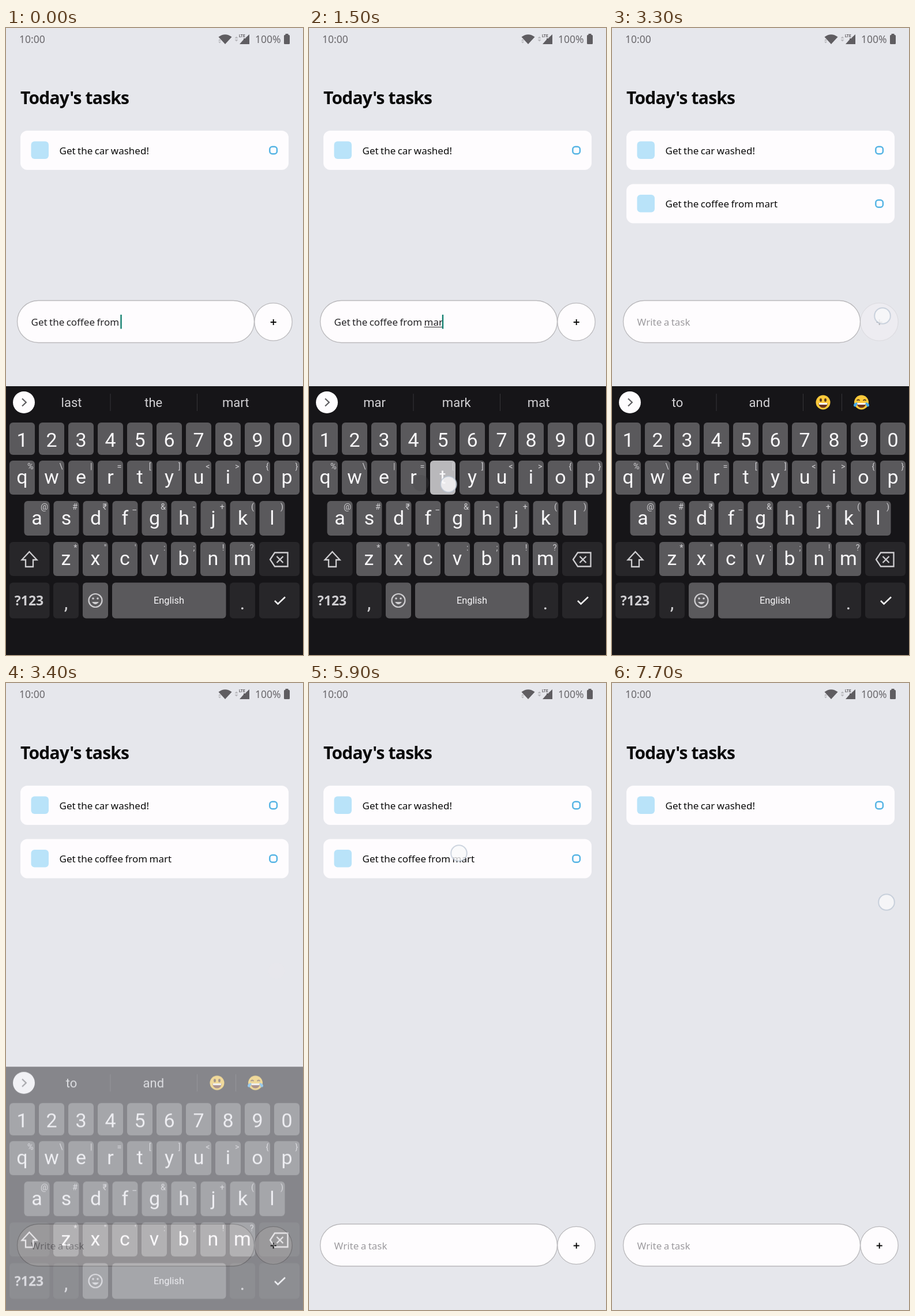
These frames come from a looping animation (515 px wide and 1087 px high, 7800 ms). An HTML page with a canvas:

```html
<!DOCTYPE html>
<html lang="en">
<head>
<meta charset="utf-8">
<title>Today's tasks</title>
<style>
html, body { margin: 0; width: 100%; height: 100%; overflow: hidden; background: #e6e7ec; }
canvas { display: block; }
</style>
</head>
<body>
<canvas id="stage" width="515" height="1087"></canvas>
<script>
const LOOP = 7800, STEP = 100, TAU = Math.PI * 2;
const c = document.getElementById('stage').getContext('2d');
const UI = '"Noto Sans", sans-serif', KEYS = 'Roboto, sans-serif';
const WHITE = '#fefcfe', KEY = '#5a595c', DARK_KEY = '#272629', KEYBOARD = '#161518';

// Touches: x, y, start, end of hold, key lit while held
const touches = [
  [418, 925, 1000, 1100, 'm'], [42, 855, 1200, 1250, 'a'],
  [194, 789, 1300, 1400, 'r'], [242, 791, 1500, 1600, 't'],
  [290, 995, 1700, 1950], [469, 499, 3100, 3300],
  [260, 295, 5900, 6050], [460, 389, 7100, 7250], [476, 380, 7700, 7800]
];
const typedAt = [1100, 1300, 1400, 1600];
const hints = [
  ['last', 'the', 'mart'], ['m', 'my', 'me'], ['ma', 'man', 'make'],
  ['mar', 'mark', 'mat'], ['mart', 'marts', 'market']
];
// Rows: letters, corner symbols, left, top, height, baseline
const rows = [
  ['1234567890', '', 6, 684, 56, 726],
  ['qwertyuiop', '%\\|=[]<>{}', 6, 750, 59, 790],
  ['asdfghjkl', '@#₹_&-+()', 31.5, 820, 60, 861],
  ['zxcvbnm', '*"\':;!?', 82, 891, 59, 931]
];

const during = (t, a, b) => t >= a && t < b;

function box(x, y, w, h, r, fill, stroke, width = 1) {
  c.beginPath();
  c.roundRect(x, y, w, h, r);
  paint(fill, stroke, width);
}

function disc(x, y, r, fill, stroke, width = 1) {
  c.beginPath();
  c.arc(x, y, r, 0, TAU);
  paint(fill, stroke, width);
}

function paint(fill, stroke, width) {
  if (fill) { c.fillStyle = fill; c.fill(); }
  if (stroke) { c.strokeStyle = stroke; c.lineWidth = width; c.stroke(); }
}

function shape(d, fill, stroke, width) {
  const path = new Path2D(d);
  if (fill) { c.fillStyle = fill; c.fill(path); }
  if (stroke) { c.strokeStyle = stroke; c.lineWidth = width; c.stroke(path); }
}

function text(s, x, y, font, fill, align = 'left') {
  c.font = font;
  c.fillStyle = fill;
  c.textAlign = align;
  c.fillText(s, x, y);
}

function withAlpha(a, draw) {
  c.save();
  c.globalAlpha *= a;
  draw();
  c.restore();
}

function statusBar() {
  const ink = '#5f5d61', pale = '#b9b9bd';
  text('10:00', 23, 26, '17.5px ' + UI, '#69676b');
  text('100%', 432, 26, '17.5px ' + UI, '#69676b');
  shape('M368.5 15.5Q380 7 391.5 15.5L380 28Z', ink);
  shape('M368 22l2.5-3 2.5 3zM368 23.5l2.5 3 2.5-3z', pale);
  shape('M396.5 18l3-3.5 3 3.5zM396.5 20l3 3.5 3-3.5z', pale);
  shape('M422 11V28H405L412 20V18H415.5V17Z', ink);
  text('LTE', 404, 16, 'bold 6.5px ' + KEYS, ink);
  box(482, 12, 10, 16, 1.5, ink);
  box(484.5, 10, 5, 3, 0.5, ink);
}

function label(s, x, y, fill) {
  c.wordSpacing = '-1px';
  text(s, x, y, '17px ' + UI, fill);
  const width = c.measureText(s).width;
  c.wordSpacing = '0px';
  return width;
}

function card(y, task) {
  box(25, y, 465, 68, 12, WHITE);
  box(43.5, y + 18.5, 30.5, 30.5, 6, '#b9e3f9');
  label(task, 92.5, y + 40.5, '#0b0b0b');
  box(457.3, y + 27.7, 12.6, 12.6, 4.5, null, '#55b4e4', 2.5);
}

function composer(t, typed) {
  const dy = t >= 3400 ? 465.5 : 0;
  c.save();
  c.translate(0, dy);
  box(19.5, 472.5, 411, 73, 36.5, WHITE, '#bab9bc', 1.3);
  if (t >= 3300) {
    label('Write a task', 43.5, 516, '#9c9a9e');
  } else {
    const before = 'Get the coffee from ', word = 'mart'.slice(0, typed);
    const start = 43.5 + label(before, 43.5, 516, '#242326');
    let end = start + label(word, start, 516, '#242326');
    if (t >= 1900) end += 4;
    else if (typed) box(start, 518, end - start, 1, 0, '#242326');
    const blinkOff = during(t, 500, 1000) || during(t, 2400, 2900);
    if (!blinkOff) box(end - 1.2, 497, 2.4, 24.5, 0, '#12806f');
  }
  withAlpha(during(t, 3200, 3400) ? 0.25 : 1, () => {
    disc(463.5, 509.5, 32.7, WHITE, '#bab9bc', 1.3);
    shape('M458.7 510H468.7M463.7 505V515', null, '#0b0b0b', 2);
  });
  c.restore();
}

function laughing(x, tears) {
  c.save();
  c.translate(x, 649);
  disc(0, 0, 12.5, '#fdc93a');
  if (tears) {
    shape('M-8-3Q-5.5-6-3-3M3-3Q5.5-6 8-3', null, '#5b3a1c', 1.8);
  } else {
    shape('M-6-4a2 3 0 1 0 4 0a2 3 0 1 0-4 0M2-4a2 3 0 1 0 4 0a2 3 0 1 0-4 0', '#5b3a1c');
  }
  shape('M-8 1H8Q7 9.5 0 9.5T-8 1Z', '#6b3420');
  shape('M-7.5 1H7.5L6.8 4H-6.8Z', '#fff');
  if (tears) {
    shape('M-7 0Q-14 1-13.5 6Q-11 9-8.5 6ZM7 0Q14 1 13.5 6Q11 9 8.5 6Z', '#3fa9ee');
  }
  c.restore();
}

function suggestions(t, typed) {
  const empty = t >= 1900, font = '22px ' + KEYS, ink = '#d2d1d4';
  const words = empty ? ['to', 'and'] : hints[typed];
  disc(31, 649, 19, WHITE);
  shape('M28 642.5L34.8 649L28 655.5', null, '#5d5c60', 2.2);
  words.forEach((w, i) => text(w, 113.5 + i * 142.3, 657, font, ink, 'center'));
  for (const x of empty ? [180.5, 331, 398] : [180.5, 331]) box(x, 634, 1, 30, 0, '#353438');
  if (empty) {
    laughing(366, false);
    laughing(432.5, true);
  }
}

function keyboard(t, typed) {
  const pale = '#cfced1';
  box(0, 621, 515, 466, 0, KEYBOARD);
  suggestions(t, typed);
  const lit = touches.filter(k => during(t, k[2], k[3])).map(k => k[4]);
  for (const [letters, corners, left, top, height, base] of rows) {
    [...letters].forEach((ch, i) => {
      const x = left + i * 51;
      box(x, top, 44, height, 6, lit.includes(ch) ? '#b9b8bb' : KEY);
      text(ch, x + 22, base, '34px ' + KEYS, '#f8f7f9', 'center');
      if (corners) text([...corners][i], x + 41.5, top + 15, '14.5px ' + KEYS, pale, 'right');
    });
  }

  box(6, 891, 69.5, 59, 6, DARK_KEY);
  box(439, 891, 70, 59, 6, DARK_KEY);
  shape('M40.5 908L53.5 922H47V934H34V922H27.5Z', null, pale, 2.3);
  shape('M458 921.5L466 909.5H488.5V933.5H466ZM469.5 916L480.5 927M480.5 916L469.5 927', null, pale, 2.3);

  [[6, 69.5, DARK_KEY], [82, 44, DARK_KEY], [133, 44, KEY], [184, 197.5, KEY],
   [388, 44, DARK_KEY], [439, 70, DARK_KEY]]
    .forEach(([x, w, fill]) => box(x, 961.5, w, 62, 6, fill));
  text('?123', 40, 1001, '600 23px ' + UI, pale, 'center');
  text(',', 104, 1008, '34px ' + KEYS, pale, 'center');
  text('.', 410, 1008, '34px ' + KEYS, pale, 'center');
  text('English', 282.5, 998, '16.4px ' + KEYS, '#f8f7f9', 'center');
  disc(155, 992.5, 11.5, null, pale, 2.2);
  disc(151, 989, 1.8, pale);
  disc(159, 989, 1.8, pale);
  shape('M149 995Q155 1003 161 995Z', pale);
  shape('M466 993L471.5 998.5L484 986.5', null, '#fff', 2.5);
}

function touchMarks(t) {
  for (const [x, y, start, end] of touches) {
    const strength = 1 - Math.max(0, t - end) / 150;
    if (t < start || strength <= 0) continue;
    if (strength === 1) {
      disc(x, y, 13.8, 'rgba(248,248,250,.78)', 'rgba(180,192,208,.65)', 2);
    } else {
      withAlpha(strength * 0.8, () => disc(x, y, 14, y > 621 ? '#444346' : '#ebe8ed'));
    }
  }
}

function draw(t) {
  const typed = typedAt.filter(at => t >= at).length;
  box(0, 0, 515, 1087, 0, '#e6e7ec');
  statusBar();
  c.letterSpacing = '-0.8px';
  text("Today's tasks", 25, 132, 'bold 30px ' + UI, '#080808');
  c.letterSpacing = '0px';
  card(178, 'Get the car washed!');
  if (during(t, 3300, 6100)) {
    withAlpha(t >= 6000 ? 0.3 : 1, () => card(270.5, 'Get the coffee from mart'));
  }
  composer(t, typed);

  // The keyboard sinks while it fades out
  const gone = Math.max(0, (t - 3300) / 200);
  if (gone < 1) {
    if (gone) {
      layer.clearRect(0, 0, 515, 1087);
      const page = c;
      swap(layer, () => keyboard(t, typed));
      withAlpha(1 - gone * 1.08, () => page.drawImage(layer.canvas, 0, gone * 88.5));
    } else {
      keyboard(t, typed);
    }
  }
  touchMarks(t);
}

// Flat offscreen copy so the keyboard fades as one piece
const sheet = document.createElement('canvas');
sheet.width = 515;
sheet.height = 1087;
const layer = sheet.getContext('2d');

function swap(target, paintKeys) {
  const { drawImage } = c, screen = c.canvas;
  const saved = document.createElement('canvas');
  saved.width = 515;
  saved.height = 1087;
  saved.getContext('2d').drawImage(screen, 0, 0);
  paintKeys();
  target.drawImage(screen, 0, 0);
  target.clearRect(0, 0, 515, 621);
  drawImage.call(c, saved, 0, 0);
}

const began = performance.now();
function tick() {
  const t = (performance.now() - began) % LOOP;
  draw(Math.floor(t / STEP) * STEP);
  requestAnimationFrame(tick);
}
tick();
</script>
</body>
</html>
```
